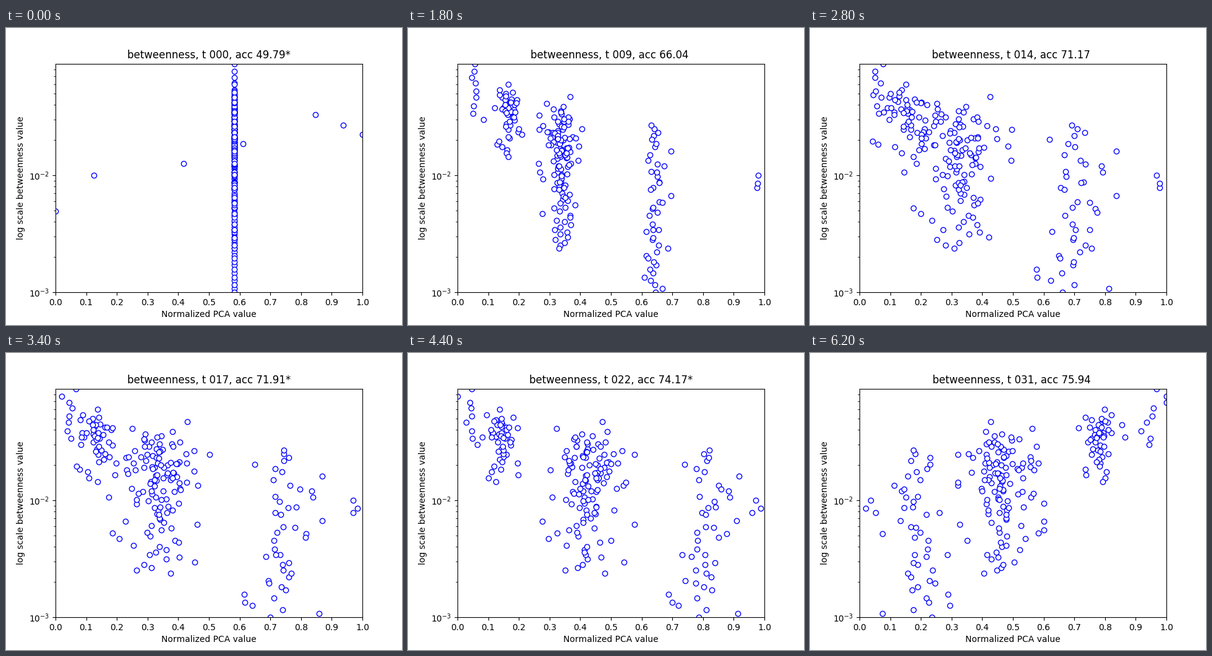
Recreate the animation shown at these times as a matplotlib script. Size 640 by 480 pixels, loop 6.4 s.

```python
import numpy as np
import matplotlib.pyplot as plt
from matplotlib.animation import FuncAnimation

STEPS, INTERVAL = 32, 200
FLIP = 23                       # the principal axis changes sign here
START = 0.582                   # shared position before training
TOP, BOTTOM, DECADE = 57.6, 427.2, 189.2    # pixel rows, pixels per decade

# Clusters drift between these times while their spread grows.
KEY_TIMES = [0, 4, 9, 14, 19, 26, 31]
GROWTH = np.array([0.2, 0.4, 1, 0.9, 0.8, 0.8])

# Node count, row range, whether rows bunch in the middle, spread, centres.
CLUSTERS = [
    (9, 58, 148, False, 0.035, [.10, .06, .07, .05, .05, .05]),
    (47, 91, 208, True, 0.045, [.26, .165, .155, .13, .17, .225]),
    (118, 111, 356, True, 0.07, [.46, .335, .32, .35, .53, .54]),
    (46, 157, 427, False, 0.055, [.672, .64, .70, .765, .86, .815]),
    (3, 238, 258, False, 0.012, [.983, .983, .981, .977, .98, .96]),
]

# Row and position of the few nodes that stand apart at the start.
LONERS = [(296, 0), (238, .125), (219, .417), (187, .61),
          (140, .847), (157, .937), (172, 1)]

ACC_TIMES = [0, 3, 4, 8, 9, 13, 14, 19, 26, 31]
ACC_VALUES = [49.79, 58.18, 57.75, 66.25, 66.04, 71.33, 71.17, 72.41, 76.51, 75.94]
accuracy = np.interp(range(STEPS), ACC_TIMES, ACC_VALUES).round(2)

rng = np.random.default_rng(7)


def wander(count, keys, memory=0.75):
    """Offsets that keep part of their value from key to key."""
    z = rng.normal(size=(count, keys))
    for k in range(1, keys):
        z[:, k] = memory * z[:, k - 1] + np.sqrt(1 - memory**2) * z[:, k]
    reach = np.sqrt(rng.exponential(size=(count, 1)))
    return np.clip(reach * z, -2.5, 2.5)


def make_cluster(count, low, high, bunched, spread, centres):
    u = np.linspace(0, 1, count)
    place = (np.sqrt(u) + u**4) / 2 if bunched else u
    rows = low + (high - low) * place + 3 * np.sin(np.pi * u) * rng.normal(size=count)
    x = np.array(centres) + spread * GROWTH * wander(count, len(centres))
    return rows, np.clip(x, 0, 1)


def positions(t):
    x = np.array([np.interp(t, KEY_TIMES, path) for path in paths])
    return 1 - x if t >= FLIP else x


parts = [make_cluster(*cluster) for cluster in CLUSTERS]
rows = np.concatenate([part[0] for part in parts])
paths = np.concatenate([part[1] for part in parts])
paths = np.insert(paths, 0, START, axis=1)
for row, x in LONERS:
    nearest = np.argmin(abs(rows - row))
    rows[nearest], paths[nearest, 0] = row, x

# Shuffle the drawing order so that clusters overlap evenly.
order = rng.permutation(len(rows))
rows, paths = rows[order], paths[order]

plt.rcParams["font.family"] = "DejaVu Sans"
plt.rcParams["text.kerning_factor"] = 6
fig, ax = plt.subplots(figsize=(6.4, 4.8), dpi=100)
ax.set_yscale("log")
ax.set_xlim(0, 1)
ax.set_ylim(1e-3, 10 ** (-3 + (BOTTOM - TOP) / DECADE))
ax.set_xticks(np.linspace(0, 1, 11))
ax.set_xlabel("Normalized PCA value")
ax.set_ylabel("log scale betweenness value")
values = 10 ** (-3 + (BOTTOM - rows) / DECADE)
dots, = ax.plot(positions(0), values, "o", color="blue", markerfacecolor="white")
title = ax.set_title("")


def update(t):
    mark = "*" if accuracy[t] == accuracy[:t + 1].max() else " "
    title.set_text(f"betweenness, t {t:03d}, acc {accuracy[t]:.2f}{mark}")
    dots.set_xdata(positions(t))
    return dots, title


anim = FuncAnimation(fig, update, frames=STEPS, interval=INTERVAL,
                     init_func=lambda: update(0), repeat=True, repeat_delay=0)
plt.show()
```
